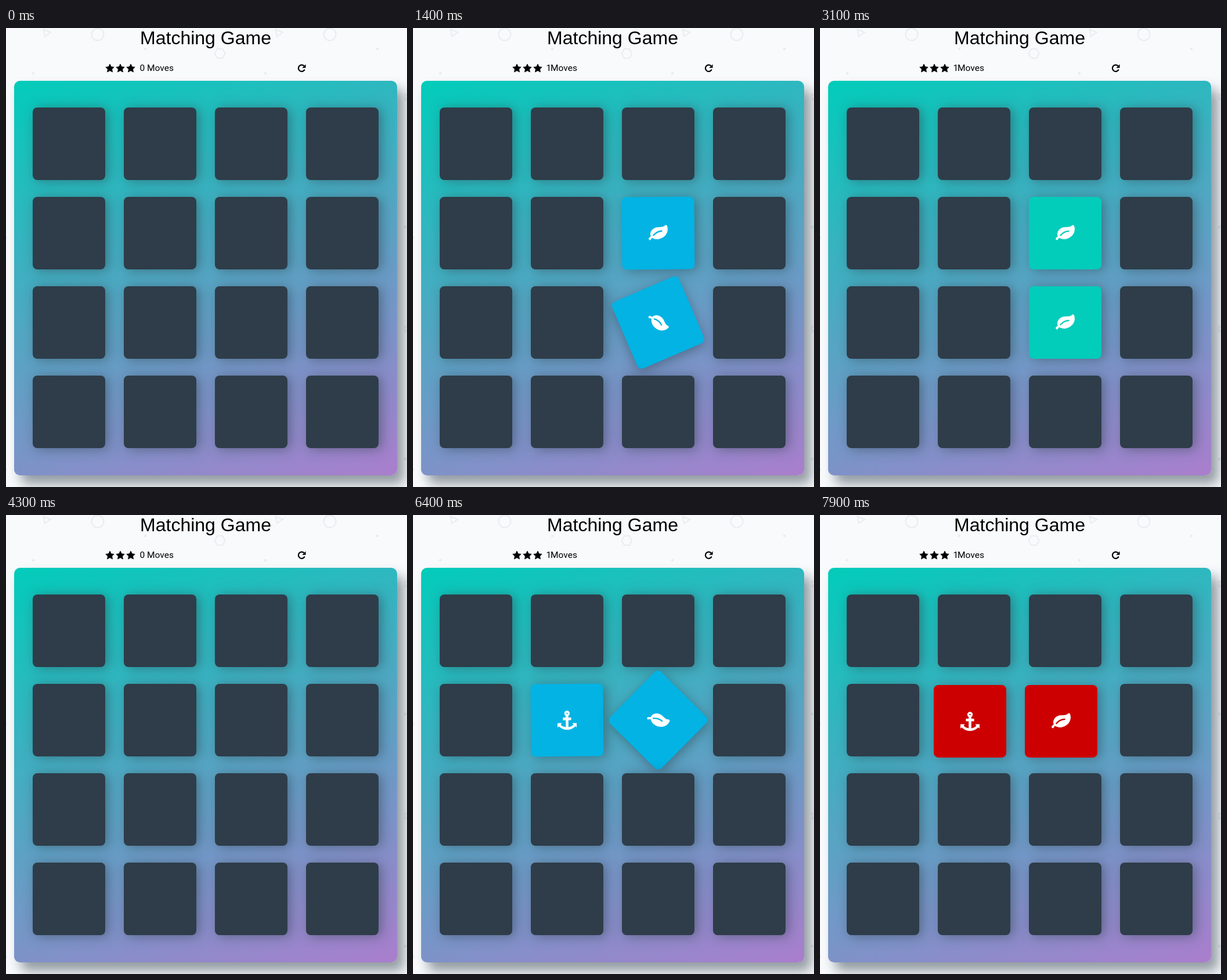
Animation, 691 px wide and 791 px high, one loop 8 s. Source, as an HTML page:

```html
<!DOCTYPE html>
<html lang="en">
<head>
<meta charset="utf-8">
<title>Matching Game</title>
<style>
  html, body { margin: 0; width: 100%; height: 100%; overflow: hidden; background: #f8fafc; }
  #stage { position: relative; width: 691px; height: 791px; overflow: hidden; }
  #stage > * { position: absolute; }
  #back { left: 0; top: 0; }
  h1 { left: 14px; top: -2px; width: 660px; margin: 0; text-align: center; font: 32px/38px "Liberation Sans", Arial, sans-serif; }
  .score { top: 59px; font: 15.5px/20px Roboto, sans-serif; color: #000; }
  #deck {
    left: 14px; top: 91px; width: 660px; height: 680px; border-radius: 10px;
    background: linear-gradient(160deg, #02ccba 0%, #aa7ecd 100%);
    box-shadow: 12px 15px 20px 0 rgba(46, 61, 73, .5);
  }
  .card {
    --face: #2e3d49;
    position: absolute; width: 125px; height: 125px; border-radius: 8px;
    background: var(--face); box-shadow: 5px 2px 20px 0 rgba(46, 61, 73, .5);
  }
  .card svg { position: absolute; left: 0; top: 0; }
</style>
</head>
<body>
<div id="stage">
  <svg id="back" width="691" height="791">
    <defs>
      <pattern id="shapes" width="400" height="400" patternUnits="userSpaceOnUse">
        <g fill="none" stroke="#eaecef" stroke-width="2">
          <path d="M64.500 2.500L77 7.500L67 14.500Z"/>
          <circle cx="158" cy="11" r="10.500"/>
          <path d="M359.500 44L364 36H373L377.500 44L373 52H364Z"/>
          <path d="M287 114L296 116L288 124Z"/>
        </g>
        <g fill="#eaecef">
          <circle cx="47" cy="78" r="2.300"/>
          <circle cx="240" cy="36" r="2.300"/>
          <circle cx="288" cy="343" r="2.500"/>
          <circle cx="0" cy="361" r="2"/>
        </g>
      </pattern>
      <path id="star" d="M0 -7.400L2.200 -2.800L7.200 -2.100L3.600 1.400L4.500 6.400L0 4L-4.500 6.400L-3.600 1.400L-7.200 -2.100L-2.200 -2.800Z"
            stroke="#000" stroke-width=".8" stroke-linejoin="round"/>
    </defs>
    <rect width="691" height="791" fill="url(#shapes)"/>
    <use href="#star" x="179" y="69.500"/>
    <use href="#star" x="197" y="69.500"/>
    <use href="#star" x="215" y="69.500"/>
    <path d="M513.600 65.400A5.600 5.600 0 1 0 514.700 71.500" fill="none" stroke="#000" stroke-width="2.200"/>
    <path d="M516.500 62.500V68.700H510.300Z"/>
  </svg>
  <h1>Matching Game</h1>
  <span class="score" id="count"></span>
  <span class="score" id="label">Moves</span>
  <div id="deck"></div>
</div>
<script>
const LOOP = 8000, STEP = 100, TURN = 1000;
const BLUE = '#02b3e4', GREEN = '#02ccba', RED = '#cc0000';

const icons = {
  leaf: `<path d="M17.9 5.1C17.9 9 15.6 11.900 12.3 13.500C10 14.600 7.500 15 5.100 14.100C4 13.700 3.600 13.200 3.200 13.300
    C2.700 13.500 2 15.400 1.300 15.400C.6 15.400 0 14.600 0 14.100C0 13.100 2 12.200 2 11.700C2 11.300 1.600 11 1.600 9.900
    C1.600 6.800 4 4.300 7 3.500C9.500 2.900 13 3.500 14.800 2.200C15.400 1.800 15.700 1.300 16.400 1.300C17.500 1.300 17.900 3.900 17.900 5.100Z"/>
    <path d="M12.200 7C9 7 6.800 8.300 4.500 10.900" fill="none" stroke="var(--face)" stroke-width="1.28" stroke-linecap="round"/>`,
  anchor: `<circle cx="8.960" cy="2.560" r="1.600" fill="none" stroke="#fff" stroke-width="1.920"/>
    <path d="M0 11.600H4.100L3 13C4 14.300 5.800 15.200 7.700 15.400V8.960H5.100V6.400H7.700V4.500H10.200V6.400H12.800V8.960H10.200V15.400
    C12.100 15.200 13.900 14.300 14.900 13L13.800 11.600H17.900V15.700L16.600 14.600C15 16.600 12 17.900 9 17.900S3 16.600 1.300 14.600L0 15.700Z"/>`
};

// Each round: two clicked cards, the verdict, and the time the board is cleared.
const rounds = [
  { cards: [6, 10], clicks: [450, 1250], verdict: 2150, match: true, end: 4300 },
  { cards: [5, 6], clicks: [5450, 6282], verdict: 7182, match: false, end: LOOP }
];
const symbols = { 5: 'anchor', 6: 'leaf', 10: 'leaf' };

const byId = id => document.getElementById(id);
const cards = Array.from({ length: 16 }, (_, i) => {
  const card = document.createElement('div');
  card.className = 'card';
  card.style.left = 32 + 157 * (i % 4) + 'px';
  card.style.top = 46 + 154 * Math.floor(i / 4) + 'px';
  if (symbols[i]) {
    card.innerHTML = `<svg width="125" height="125"><g fill="#fff"
      transform="translate(62.500 62.500) scale(1.84) translate(-8.960 -8.870)">${icons[symbols[i]]}</g></svg>`;
  }
  byId('deck').append(card);
  return card;
});

// CSS "ease": cubic-bezier(.25, .1, .25, 1)
function ease(x) {
  if (x >= 1) return 1;
  let lo = 0, hi = 1;
  for (let i = 0; i < 24; i++) {
    const s = (lo + hi) / 2;
    if (.75 * s * (1 - s) + s ** 3 < x) lo = s; else hi = s;
  }
  return .3 * lo * (1 - lo) ** 2 + 3 * lo * lo * (1 - lo) + lo ** 3;
}

function shake(u) {
  if (u >= 1) return '';
  const a = 6 * Math.PI * u;
  return `translate(${-8.5 * Math.sin(a)}px, ${4.5 * (1 - Math.cos(a))}px)`;
}

function turn(kind, u) {
  return u >= 1 ? '' : `${kind}(${360 * ease(u)}deg)`;
}

function paint(card, face, transform) {
  card.style.setProperty('--face', face || '#2e3d49');
  card.style.transform = transform || 'none';
  if (card.firstChild) card.firstChild.style.display = face ? '' : 'none';
}

function draw(t) {
  cards.forEach(card => paint(card));
  let moves = 0;
  for (const { cards: pair, clicks, verdict, match, end } of rounds) {
    if (t >= end) continue;
    if (t >= clicks[1]) moves = 1;
    pair.forEach((index, i) => {
      const judged = (t - verdict) / TURN;
      if (judged >= 0) {
        paint(cards[index], match ? GREEN : RED, match ? turn('rotateY', judged) : shake(judged));
      } else if (t >= clicks[i]) {
        paint(cards[index], BLUE, turn('rotate', (t - clicks[i]) / TURN));
      }
    });
  }
  byId('count').textContent = moves;
  byId('count').style.left = moves ? '229.5px' : '230.5px';
  byId('label').style.left = moves ? '237px' : '243px';
}

// The picture advances ten times a second.
function tick() {
  draw(Math.floor(performance.now() % LOOP / STEP) * STEP);
  requestAnimationFrame(tick);
}
tick();
</script>
</body>
</html>
```
